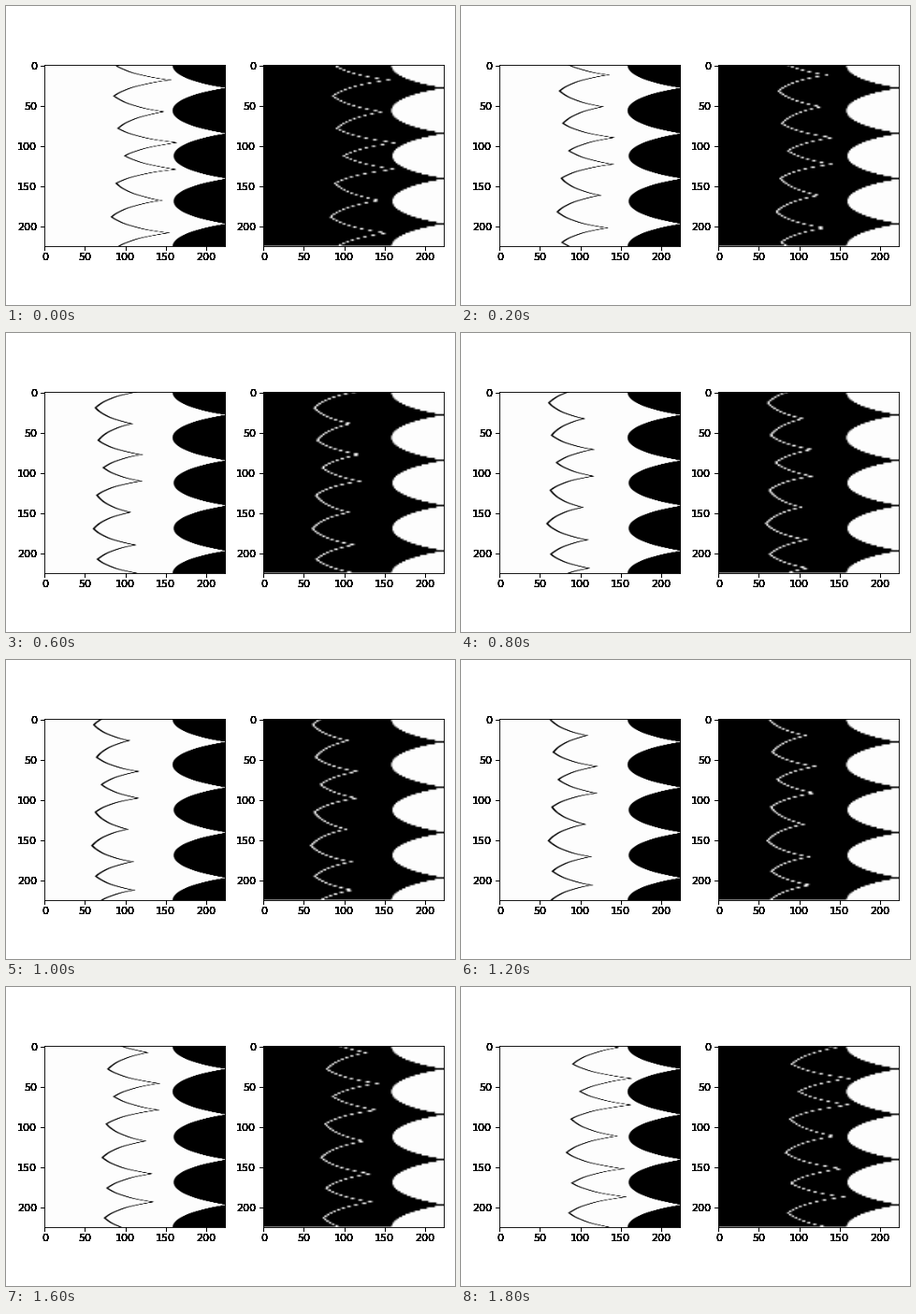
These frames come from a looping animation (480x320 px, 2000 ms). A matplotlib script:

```python
import numpy as np
import matplotlib.pyplot as plt
from matplotlib.animation import FuncAnimation

SIZE = 224
HALF = SIZE / 2
FRAMES = 10
WHITE = 0.992
LINE = 1.7
TICKS = range(0, SIZE, 50)

# Polar grid: columns are radius, rows are angle.
radius = np.arange(SIZE) * HALF * np.sqrt(2) / SIZE
angle = np.arange(SIZE) * 2 * np.pi / SIZE
GRID = radius[None, :] * np.exp(1j * angle[:, None])


def square_mask():
    """Pixels 0..SIZE-1 around the centre, fading out over one pixel."""
    high = np.maximum(GRID.real, GRID.imag)
    low = np.minimum(GRID.real, GRID.imag)
    return np.clip(np.minimum(HALF - high, low + HALF + 1), 0, 1)


def hexagram():
    """Slightly sheared six-pointed star, as complex points around its centre."""
    a, c = 76 - 23.4j, -24.9 + 75.2j
    tips = np.array([a, a + c, c, -a, -a - c, -c])
    notches = (tips + np.roll(tips, -1)) / 3
    return np.column_stack([tips, notches]).ravel() - 1.2 + 2.3j


INSIDE = square_mask()
STAR = hexagram()


def segment_distance(p, q):
    d = q - p
    s = np.clip(((GRID - p) * np.conj(d)).real / abs(d) ** 2, 0, 1)
    return abs(GRID - p - s * d)


def polar_star(k):
    """The star turned by a shear-like rotation, unrolled to polar axes."""
    turn = np.radians(-45 + 10 * k)
    points = STAR * np.exp(-1j * turn) / np.cos(turn)
    dist = np.min([segment_distance(p, q)
                   for p, q in zip(points, np.roll(points, -1))], axis=0)
    return INSIDE * (1 - np.clip(LINE / 2 + 0.5 - dist, 0, 1))


def spread(low):
    """Bilinear stride-two transposed convolution along the first axis."""
    out = np.zeros((2 * len(low), low.shape[1]))
    out[::2] = low
    out[1::2] = low / 2
    out[1:-1:2] += low[1:] / 2
    return out


def coarse_inverse(img):
    return 1 - spread(spread(img[::2, ::2].T).T)


def set_axes(ax):
    ax.set(xlim=(-0.5, SIZE - 0.5), ylim=(SIZE - 0.5, -0.5),
           xticks=TICKS, yticks=TICKS)


pairs = [(img * WHITE, coarse_inverse(img) * WHITE)
         for img in map(polar_star, range(FRAMES))]

fig, axes = plt.subplots(1, 2, figsize=(6, 4), dpi=80)
views = []
for ax, img in zip(axes, pairs[0]):
    views.append(ax.imshow(img, cmap="gray", vmin=0, vmax=1))
    set_axes(ax)
fig.tight_layout()

# Stack copies of the axes so the labels become heavy and hard-edged.
for ax in axes:
    ax.apply_aspect()
    for _ in range(9):
        top = fig.add_axes(ax.get_position())
        top.patch.set_visible(False)
        top.spines[:].set_visible(False)
        set_axes(top)


def update(k):
    for view, img in zip(views, pairs[k]):
        view.set_data(img)
    return views


anim = FuncAnimation(fig, update, frames=FRAMES, interval=200,
                     repeat=True, repeat_delay=0)
plt.show()
```
